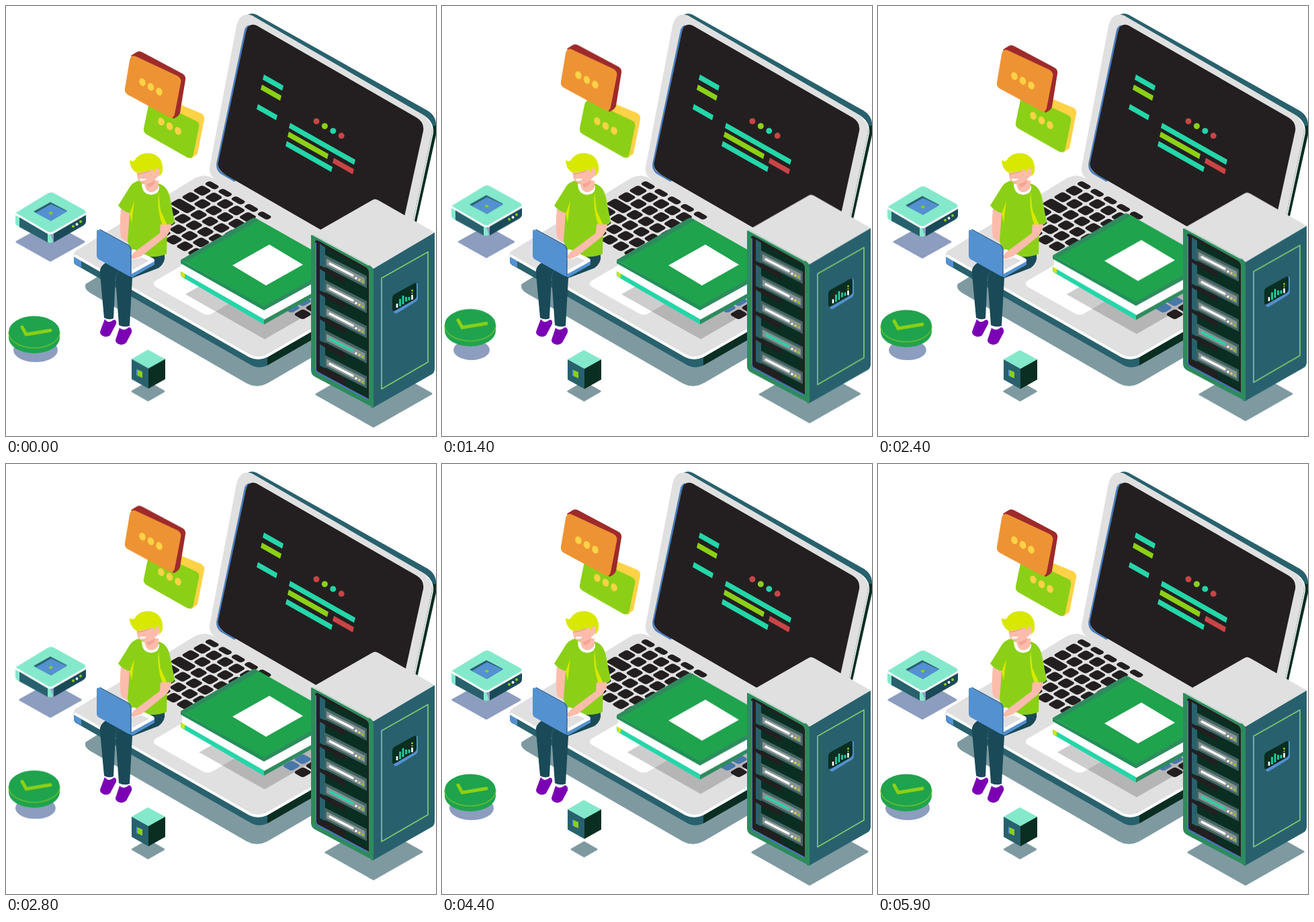
An HTML page that plays this animation: 640 px wide and 640 px high, repeating every 6000 ms.

```html
<!DOCTYPE html>
<html lang="en">
<head>
<meta charset="utf-8">
<title>Isometric workspace</title>
<style>
html, body { margin: 0; height: 100%; overflow: hidden; background: #fff; }
svg { display: block; width: 100vw; height: 100vh; }

.float, .shade { animation: 6s ease-in-out infinite; animation-delay: var(--at); }
.float { animation-name: float; }
.shade { animation-name: shrink; stroke-width: 3; stroke-linejoin: round; }
@keyframes float {
  0%, 65%, 100% { transform: translateY(0); }
  32.5% { transform: translateY(var(--dy, -11.5px)); }
}
@keyframes shrink {
  0%, 65%, 100% { transform: scale(1); }
  32.5% { transform: scale(.8); }
}
.early { --at: -6.15s; }
.server { --at: -5.75s; --dy: -10px; }
.reply { --at: -4.87s; }
.book { --at: -4.67s; }
.cube { --at: -3.6s; --dy: -12px; }

.gray { fill: #e0e0e0; }
.teal { fill: #28616d; }
.navy { fill: #1a4a57; }
.deep { fill: #0a2e21; }
.ink { fill: #231f20; }
.mint { fill: #84e9cb; }
.aqua { fill: #24d6a8; }
.lime { fill: #8bd016; }
.leaf { fill: #1fa34d; }
.moss { fill: #2e8b5e; }
.blue { fill: #5491d1; }
.red { fill: #c84545; }
.skin { fill: #fcbcab; }
.white { fill: #fff; }
.yellow { fill: #fdd247; }
.slate { fill: #7e9aa0; stroke: #7e9aa0; }
.haze { fill: #8c9dbf; stroke: #8c9dbf; }
.line { fill: none; stroke-linecap: round; stroke-linejoin: round; }
</style>
</head>
<body>
<svg viewBox="0 0 640 640">
  <!-- laptop -->
  <path class="slate" stroke="none" d="M119 414Q116 421 126 427L358 561Q374 570 391 560L480 508 440 470 150 395Z"/>
  <path class="teal" d="M101 370V381Q102 385 107 387L364 534Q376 541 389 535V515Z"/>
  <path class="blue" d="M101 370V381Q102 385 112 389V376Z"/>
  <path class="deep" d="M389 515V535L490 477V457Z"/>
  <path class="gray" d="M103 365L280 257Q293 249 306 255L570 390V416L388 521Q375 528 364 521L104 373Q99 369 103 365Z"/>
  <path class="line" stroke="#fff" stroke-width="4" d="M103 372L363 521Q375 527 388 521L480 468"/>
  <path class="white" d="M224 408L310 358 394 407 308 457Q300 462 292 457L223 418Q216 413 224 408Z"/>
  <g id="keys" transform="matrix(.866 .5 -.866 .5 303 260)"></g>

  <path class="teal" d="M358 14Q365 9 373 13L628 156Q642 165 640 182L637 196 600 190Z"/>
  <path class="deep" d="M640 178V192L611 322 600 316 628 180Z"/>
  <path class="gray" d="M303 240L343 30Q348 8 366 14L621 162Q637 171 634 190L606 320 560 390 470 350 312 258Q302 252 303 240Z"/>
  <path class="line" stroke="#fff" stroke-width="1.500" d="M627 168Q637 176 635 190L607 320"/>
  <path class="line" stroke="#4b7fc0" stroke-width="3" d="M361 30Q357 32 356 38L315 233Q313 243 321 249L340 260"/>
  <path class="ink" d="M357 39Q360 24 373 29L611 166Q623 173 621 186L592 318 560 386 328 252Q313 243 316 232Z"/>
  <g id="code"></g>

  <!-- book -->
  <path class="shade book" style="transform-origin:384px 429px" fill="#231f20" fill-opacity=".22" d="M267 429L385 362 501 429 385 496Z"/>
  <g class="float book">
    <path class="moss" d="M384 460L480 407V420L384 474Z"/>
    <path class="white" d="M262 380L384 448 480 396V414L384 467 262 398Z"/>
    <path class="aqua" d="M260 395L384 466V474L263 404Q260 402 260 400Z"/>
    <path fill="#d6e400" d="M260 395L266 398V405L261 402Z"/>
    <path fill="#238f58" d="M260 378V383L384 453V446Z"/>
    <path class="moss" d="M384 446V453L480 400V392Z"/>
    <path class="leaf" d="M260 378L365 317Q369 314 374 317L480 377V393L384 447Z"/>
    <path class="moss" d="M260 378L365 317Q369 314 374 317L376 319 266 381Z"/>
    <path class="white" d="M337 386L392 355 442 385 387 416Z"/>
  </g>

  <!-- server -->
  <path class="slate shade server" style="transform-origin:547px 578px" d="M462 578L547 529 633 577 547 626Z"/>
  <g class="float server">
    <path class="moss" d="M454 341L547 389V598L460 552Q454 549 454 542Z"/>
    <path class="teal" d="M545 391L638 337V540Q638 545 634 548L546 598Z"/>
    <path class="gray" d="M454 341L545 289Q549 286 554 289L638 337 547 391Z"/>
    <path class="line" stroke="#2e8b5e" stroke-width="4" d="M456 342L541 388Q545 391 545 397V596"/>
    <path class="line" stroke="#fff" d="M455 340L540 386"/>
    <path class="ink" d="M460 351Q461 347 466 350L536 389Q540 392 540 397V585L464 546Q460 544 460 540Z"/>
    <path class="line" stroke="#4777bc" stroke-width="2" d="M461 353V540Q461 544 465 546L538 585"/>
    <g id="bays"></g>
    <path class="line" stroke="#7fc96f" stroke-width="1.700" d="M559 405L628 366V530L559 570Z"/>
    <path class="blue" d="M580 429L609 413Q613 411 613 416V435Q613 438 610 440L584 456Q579 460 577 455Z"/>
    <path class="deep" d="M578 429L607 413Q611 411 611 415V432Q611 435 608 437L580 453Q575 456 575 451V434Q575 431 578 429Z"/>
    <g id="chart" stroke-width="2.600"></g>
  </g>

  <!-- router -->
  <path class="haze shade early" style="transform-origin:66px 351px" d="M16 351L66 323 116 351 66 379Z"/>
  <g class="float early">
    <path class="mint" d="M14 311L66 340 70 351Q66 354 61 351L18 328Q14 326 14 322Z"/>
    <path class="teal" d="M20 313L62 338V352L20 329Z"/>
    <path class="navy" d="M71 338L119 309V321Q119 324 115 327L71 352Z"/>
    <path class="mint" d="M16 307L62 279Q67 276 72 279L117 304Q120 307 117 310L71 337Q66 340 61 337L16 311Q13 309 16 307Z"/>
    <path class="line" stroke="#fff" stroke-width="3" d="M15 310L61 337Q66 340 71 337L118 310"/>
    <path class="teal" d="M41 306L66 292 91 305 67 320Z"/>
    <path class="blue" d="M44 308L67 295 91 306 67 320Z"/>
    <path class="lime" d="M63 308L67 306 70 308 67 311Z"/>
    <circle class="lime" cx="100" cy="328" r="2"/>
    <circle class="white" cx="105.500" cy="325" r="2"/>
    <circle class="lime" cx="111" cy="321" r="2"/>
  </g>

  <!-- check mark -->
  <ellipse class="haze shade early" style="transform-origin:44px 512px" cx="44" cy="512" rx="31.500" ry="16.500"/>
  <g class="float early">
    <path class="leaf" d="M4 485V494A38 23 0 0 0 80 494V485Z"/>
    <ellipse class="leaf" cx="42" cy="485" rx="38" ry="23.500"/>
    <path class="line" stroke="#62bd38" stroke-width="1.500" d="M4 486A38 23 0 0 0 80 486"/>
    <path class="line" stroke="#8bd016" stroke-width="5" d="M24 478L30 489 66 483"/>
  </g>

  <!-- cube -->
  <path class="slate shade cube" style="transform-origin:211.500px 573.500px" d="M188 573.500L211.500 560 235 573.500 211.500 587Z"/>
  <g class="float cube">
    <path class="mint" d="M187 526L211 512 237 526 212 541Z"/>
    <path class="teal" d="M187 526L212 540V570L187 556Z"/>
    <path class="deep" d="M212 540L237 526V556L212 570Z"/>
    <path class="blue" d="M194 541L203 545V554L194 550Z"/>
    <path class="lime" d="M196 542L203 545V554L196 551Z"/>
  </g>

  <!-- person -->
  <g>
    <path class="white" d="M148 462L160 464 164 470 150 472ZM169 474L183 475 186 482 170 484Z"/>
    <path fill="#7b00b4" d="M147 466Q153 474 160 467 165 466 164 473L155 490Q150 494 144 491 138 488 141 482ZM169 479Q175 485 183 478 188 479 187 486L179 501Q174 506 167 503 161 500 164 494Z"/>
    <path class="navy" d="M182 362L236 370Q238 382 227 390L188 405 184 476Q176 479 168 475L163 405 160 465Q153 468 146 464L140 399Q138 388 150 381Z"/>
    <path class="line" stroke="#28616d" d="M163 405Q163 394 173 390"/>
    <path class="skin" d="M171 302L186 306 182 352 172 346Q168 337 171 302Z"/>
    <path class="lime" d="M201 259Q188 261 182 273L167 297Q174 306 184 308L181 350 186 366Q215 379 239 369L240 325Q248 327 251 321L244 285Q240 267 226 264Z"/>
    <path fill="#d8e800" d="M227 277Q224 302 233 327L240 326 230 304ZM184 309L191 290 187 323Z"/>
    <path class="white" d="M202 264Q202 280 216 281 229 280 228 268Z"/>
    <path class="skin" d="M206 257L227 260V270Q222 278 214 277 207 275 206 264Z"/>
    <path class="skin" d="M195 244Q194 255 198 261 205 266 219 261L233 247 225 233Z"/>
    <path fill="#f4a596" d="M209 265Q217 263 222 259 222 267 212 270Z"/>
    <path class="white" d="M199 257L209 257Q206 261 200 260Z"/>
    <path class="line" stroke="#e79a8b" stroke-width="1.200" d="M195 250Q205 250 214 245"/>
    <path fill="#d8e800" d="M184 229Q190 234 194 226 201 218 213 219 231 221 233 239 234 249 228 254 231 243 226 241 222 242 222 248L218 243Q207 248 194 248 184 242 184 229Z"/>
    <path class="white" d="M179 365L190 362 218 375Q223 378 220 382L190 400 180 398Z"/>
    <path class="blue" d="M183 401L221 380V385L188 404Z"/>
    <path class="gray" d="M186 378L202 374 213 379 188 393Z"/>
    <path class="skin" d="M230 325L246 325Q245 337 237 344L202 372 189 377Q184 374 190 367L229 338Z"/>
    <path class="blue" d="M135 336Q135 331 140 334L182 357Q186 360 186 364V399Q186 404 181 401L138 377Q135 375 135 371Z"/>
    <path class="line" stroke="#356a9e" stroke-width="1.600" d="M140 333L182 356Q186 359 186 364V400"/>
  </g>

  <!-- speech bubbles -->
  <g class="float reply">
    <path class="yellow" d="M221 138Q224 132 231 135L291 160Q296 163 295 169L285 220 276 227 214 180Z"/>
    <path class="lime" d="M212 148Q214 138 222 142L283 171Q289 174 287 181L279 220Q277 229 269 225L209 191Q204 188 205 182Z"/>
    <g class="dots yellow" transform="translate(231 172)"></g>
  </g>
  <g class="float early">
    <path fill="#9e2a2b" d="M186 74L194 69Q198 66 203 69L263 101Q268 104 267 110L259 159Q258 164 249 168Z"/>
    <path fill="#ee9333" d="M184 81Q186 72 193 75L255 104Q262 108 260 115L251 161Q249 169 242 165L181 132Q176 129 177 123Z"/>
    <g class="dots yellow" transform="translate(203 113.500)"></g>
  </g>
</svg>

<script>
const add = (id, html) => document.getElementById(id).insertAdjacentHTML('beforeend', html);

// Keyboard: one thin row, then six full rows with a wide first key
const key = (u, v, w, h, cls) =>
  add('keys', `<rect class="${cls}" x="${u}" y="${v}" width="${w}" height="${h}" rx="4"/>`);
for (let i = 0; i < 5; i++) key(i * 22.5, 0, 18, 9.5, 'ink');
[17, 17, 30, 22, 34, 26].forEach((first, row) => {
  for (let u = 0, w = first; u < 95; u += w + 3.5, w = 16)
    key(u, 13 + row * 19.5, w, 16.5, 'ink');
});
// Arrow keys in the far corner
for (let i = 0; i < 6; i++)
  key(232 + i % 3 * 19.5, 91 + (i > 2) * 19.5, 16, 16.5, i % 3 < 2 ? 'blue' : 'ink');

// Lines of code on the screen: x, y, length, colour
[
  [384, 102, 29, 'aqua'], [381, 117, 29, 'lime'], [375, 146, 29, 'aqua'],
  [423, 174, 97, 'aqua'], [421, 187, 59, 'lime'], [488, 226, 30, 'red'], [418, 201, 68, 'aqua']
].forEach(([x, y, w, c]) =>
  add('code', `<path class="${c}" d="M${x} ${y}l${w} ${w * .565}-2 7.5${-w} ${-w * .565}Z"/>`));
['red', 'lime', 'aqua', 'red'].forEach((c, i) =>
  add('code', `<circle class="${c}" cx="${462 + i * 12.4}" cy="${171.5 + i * 7.2}" r="4.5"/>`));

// Server bays
for (let i = 0; i < 5; i++) {
  const lamp = (x, y, c) => `<circle class="${c}" cx="${x}" cy="${y}" r="1.7"/>`;
  add('bays', `<g transform="translate(0 ${i * 37.3})">
    <path class="deep" d="M467 355L539 394V433L467 394Z"/>
    <path class="teal" d="M467 354L475 359V390L467 386Z"/>
    <path class="ink" d="M467 387L475 390 505 405V415L467 396Z"/>
    <path fill="#426462" d="M474 370L537 402V420L474 388Z"/>
    <path fill="#879394" d="M477 376L534 405V415L477 386Z"/>
    <path class="line" stroke="${i === 3 ? '#24d6a8' : '#fff'}" stroke-width="3.4" d="M482 383.500L516 401"/>
    ${lamp(521, 405, 'white') + lamp(526, 407.5, 'yellow') + lamp(531, 410, 'lime')}</g>`);
}

// Small chart: lower end and height of each bar
[[449, 6], [447, 11], [444, 13], [440, 7], [438, 5], [437, 7]].forEach(([y, h], i) =>
  add('chart', `<path stroke="${i % 5 ? '#24d6a8' : '#fff'}" d="M${582 + i * 4.5} ${y}v${-h}"/>`));
add('chart', '<circle class="lime" cx="604.500" cy="423.500" r="1.500"/><circle class="yellow" cx="604.500" cy="427.500" r="1"/>');

document.querySelectorAll('.dots').forEach(g => {
  for (let i = 0; i < 3; i++)
    g.insertAdjacentHTML('beforeend',
      `<ellipse rx="4.6" ry="6" transform="translate(${i * 12.5} ${i * 7}) rotate(-20)"/>`);
});
</script>
</body>
</html>
```
